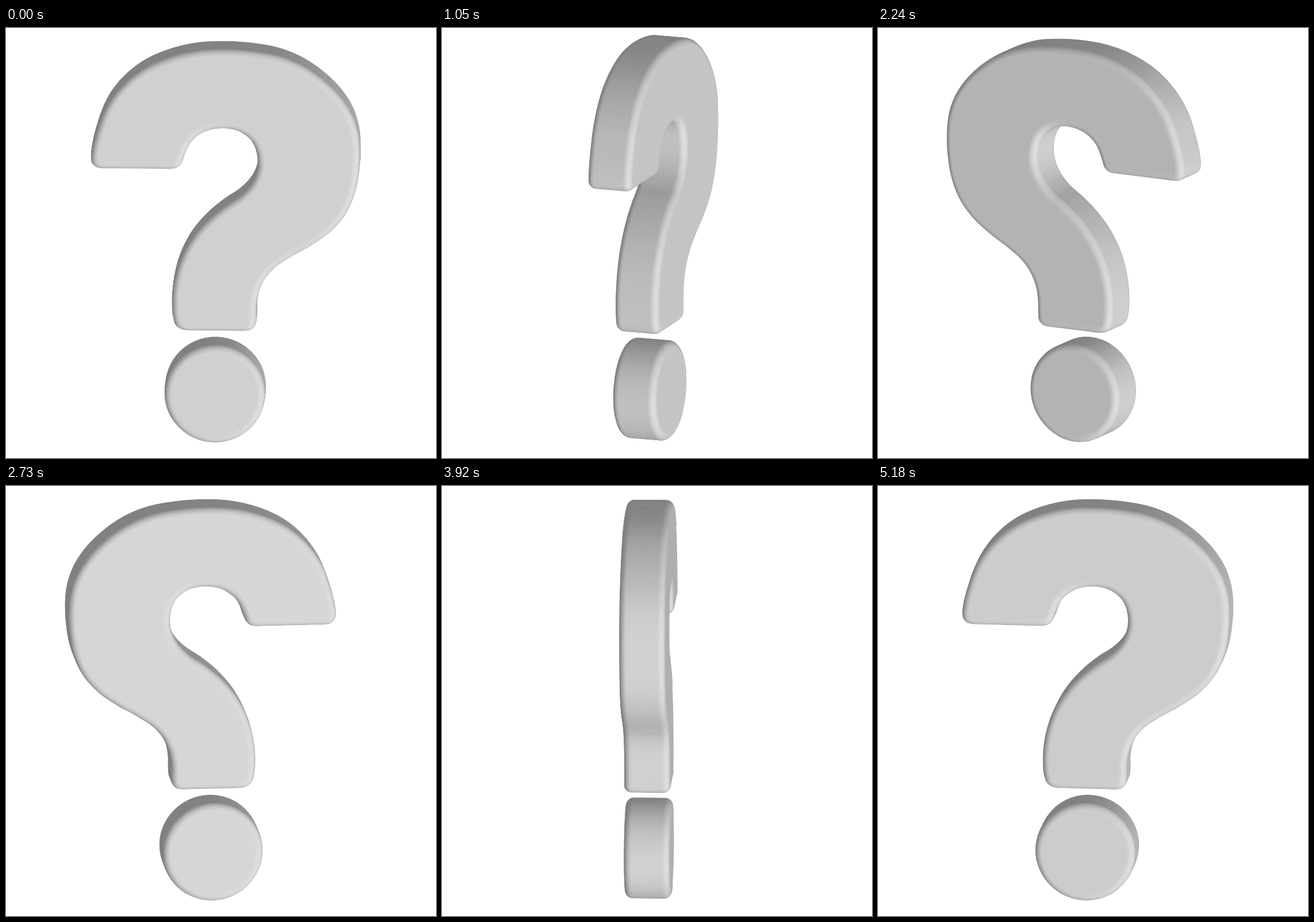
An HTML page with a canvas that plays this animation: 748 px wide and 748 px high, repeating every 5250 ms.

```html
<!DOCTYPE html>
<html lang="en">
<head>
<meta charset="utf-8">
<title>Turning question mark</title>
<style>
html, body { margin: 0; width: 100%; height: 100%; overflow: hidden; background: #fff; }
canvas { display: block; width: 748px; height: 748px; }
</style>
</head>
<body>
<canvas id="stage" width="748" height="748"></canvas>
<script>
const ctx = document.getElementById('stage').getContext('2d');
const STEP = 70, COUNT = 75, TAU = Math.PI * 2;
const START = -1.6 * Math.PI / 180;
const PITCH = 13.7 * Math.PI / 180;
const SP = Math.sin(PITCH), CP = Math.cos(PITCH);
const CX = 360.3, CY = 371.5;
const HALF = 39.7, BEVEL = 12;
const LIGHT = [45, -10, 84], AMBIENT = 125, SOFT = 15;

// Outline of the hook as x, y pairs, before the pitch is undone
const OUTLINE = [
  149,219, 151,230, 158,236, 169,238, 180,238, 278,238, 288,238, 298,236,
  305,230, 310,217, 322,192, 345,174, 377,167, 408,173, 429,190, 438,213,
  438,237, 428,262, 408,284, 380,303, 350,328, 323,360, 304,396, 293,436,
  290,472, 292,497, 297,511, 306,517, 318,519, 329,519, 404,519, 415,519,
  427,517, 434,510, 436,498, 436,480, 440,453, 449,432, 465,412, 490,394,
  530,371, 565,346, 591,316, 607,280, 614,245, 616,210, 613,175, 601,140,
  581,110, 551,81, 511,55, 471,40, 430,33, 380,30, 330,33, 281,45, 236,66,
  201,95, 176,129, 159,172, 151,203
];

function toModel(x, y) {
  return { x: x - CX, y: (CY - y) / CP };
}

// Closed smooth curve with chord-length tangents
function smooth(flat) {
  const pts = [];
  for (let i = 0; i < flat.length; i += 2) pts.push(toModel(flat[i], flat[i + 1]));
  const n = pts.length, at = i => pts[(i + n) % n];
  const chord = i => Math.hypot(at(i + 1).x - at(i).x, at(i + 1).y - at(i).y);
  const tangent = (i, k) => {
    const a = chord(i - 1), b = chord(i);
    return ((at(i)[k] - at(i - 1)[k]) / a * b + (at(i + 1)[k] - at(i)[k]) / b * a) / (a + b);
  };
  const out = [];
  for (let i = 0; i < n; i++) {
    const len = chord(i), steps = Math.ceil(len / 5);
    const mix = (k, u) => {
      const v = 1 - u;
      return v * v * (1 + 2 * u) * at(i)[k] + u * u * (3 - 2 * u) * at(i + 1)[k] +
        len * u * v * (v * tangent(i, k) - u * tangent(i + 1, k));
    };
    for (let s = 0; s < steps; s++) out.push({ x: mix('x', s / steps), y: mix('y', s / steps) });
  }
  return out;
}

function circle(cx, cy, r, n) {
  const c = toModel(cx, cy);
  return Array.from({ length: n }, (_, i) => ({
    x: c.x + r * Math.cos(i / n * TAU), y: c.y + r * Math.sin(i / n * TAU)
  }));
}

function addNormals(loop) {
  const n = loop.length;
  loop.forEach((p, i) => {
    const a = loop[(i + n - 1) % n], b = loop[(i + 1) % n];
    const dx = b.x - a.x, dy = b.y - a.y, d = Math.hypot(dx, dy);
    p.nx = dy / d;
    p.ny = -dx / d;
  });
  return loop;
}

const loops = [addNormals(smooth(OUTLINE)), addNormals(circle(364, 629, 87, 110))];

// Cross-section rings: z, inset, and the tilt of the normal towards z
const rings = [];
const ARC = 6, SLICES = 6;
for (let i = 0; i <= ARC; i++) {
  const a = -Math.PI / 2 * (1 - i / ARC);
  rings.push({ z: -HALF + BEVEL + BEVEL * Math.sin(a), inset: BEVEL * (1 - Math.cos(a)), tilt: a });
}
for (let i = 1; i < SLICES; i++) {
  rings.push({ z: (HALF - BEVEL) * (2 * i / SLICES - 1), inset: 0, tilt: 0 });
}
for (let i = ARC; i >= 0; i--) {
  const r = rings[i];
  rings.push({ z: -r.z, inset: r.inset, tilt: -r.tilt });
}

const edges = [];
loops.forEach((loop, id) => loop.forEach((a, i) => {
  const b = loop[(i + 1) % loop.length];
  const nx = a.nx + b.nx, ny = a.ny + b.ny, d = Math.hypot(nx, ny);
  edges.push({ a, b, id, i, size: loop.length, x: (a.x + b.x) / 2, y: (a.y + b.y) / 2, nx: nx / d, ny: ny / d });
}));

// Distances at which the light ray from an edge meets the other walls
function rayHits(e, l) {
  const ox = e.x + e.nx, oy = e.y + e.ny, hits = [];
  for (const f of edges) {
    if (f.id === e.id) {
      const gap = Math.abs(f.i - e.i);
      if (Math.min(gap, f.size - gap) < 4) continue;
    }
    const ex = f.b.x - f.a.x, ey = f.b.y - f.a.y;
    const det = l[0] * ey - l[1] * ex;
    if (Math.abs(det) < 1e-6) continue;
    const wx = f.a.x - ox, wy = f.a.y - oy;
    const t = (wx * ey - wy * ex) / det, u = (wx * l[1] - wy * l[0]) / det;
    if (t > 0 && u >= 0 && u < 1) hits.push(t);
  }
  return hits;
}

// Diffuse light over an ambient floor, with a soft terminator
function grey(v) {
  const g = Math.round(AMBIENT + (v + Math.hypot(v, SOFT)) / 2);
  return `rgb(${g},${g},${g})`;
}

function draw(theta) {
  const c = Math.cos(theta), s = Math.sin(theta);
  const view = [-CP * s, SP, CP * c];
  const l = [LIGHT[0] * c - LIGHT[2] * s, LIGHT[1], LIGHT[0] * s + LIGHT[2] * c];
  const project = (p, r) => {
    const x = p.x - p.nx * r.inset, y = p.y - p.ny * r.inset;
    return [CX + x * c + r.z * s, CY - y * CP + (r.z * c - x * s) * SP];
  };

  ctx.fillStyle = '#fff';
  ctx.fillRect(0, 0, 748, 748);
  ctx.lineWidth = 0.6;
  ctx.lineJoin = 'round';

  const order = edges.map(e => ({ e, d: e.x * view[0] + e.y * view[1] })).sort((p, q) => p.d - q.d);
  const last = rings.length - 1;
  for (const { e } of order) {
    const facing = e.nx * view[0] + e.ny * view[1];
    const lit = e.nx * l[0] + e.ny * l[1];
    let hits = null;
    for (let k = 0; k < last; k++) {
      const j = c > 0 ? k : last - 1 - k;
      const r = rings[j], q = rings[j + 1];
      const tilt = (r.tilt + q.tilt) / 2, ct = Math.cos(tilt), st = Math.sin(tilt);
      if (facing * ct + view[2] * st < -0.03) continue;
      let v = lit * ct + l[2] * st;
      if (v > 0 && lit > 0) {
        hits = hits || rayHits(e, l);
        const z = (r.z + q.z) / 2;
        if (hits.some(t => Math.abs(z + l[2] * t) < HALF - 2)) v = 0;
      }
      ctx.fillStyle = ctx.strokeStyle = grey(v);
      ctx.beginPath();
      ctx.moveTo(...project(e.a, r));
      ctx.lineTo(...project(e.b, r));
      ctx.lineTo(...project(e.b, q));
      ctx.lineTo(...project(e.a, q));
      ctx.closePath();
      ctx.fill();
      ctx.stroke();
    }
  }

  // The flat side towards the viewer is never covered
  const side = c > 0 ? 1 : -1;
  const rim = rings[c > 0 ? last : 0];
  ctx.fillStyle = grey(l[2] * side);
  ctx.beginPath();
  for (const loop of loops) {
    loop.forEach((p, i) => {
      const [x, y] = project(p, rim);
      if (i) ctx.lineTo(x, y); else ctx.moveTo(x, y);
    });
    ctx.closePath();
  }
  ctx.fill();
}

let shown = -1;
function tick() {
  const step = Math.floor(performance.now() / STEP) % COUNT;
  if (step !== shown) {
    shown = step;
    draw(START + step / COUNT * TAU);
  }
  requestAnimationFrame(tick);
}
tick();
</script>
</body>
</html>
```
